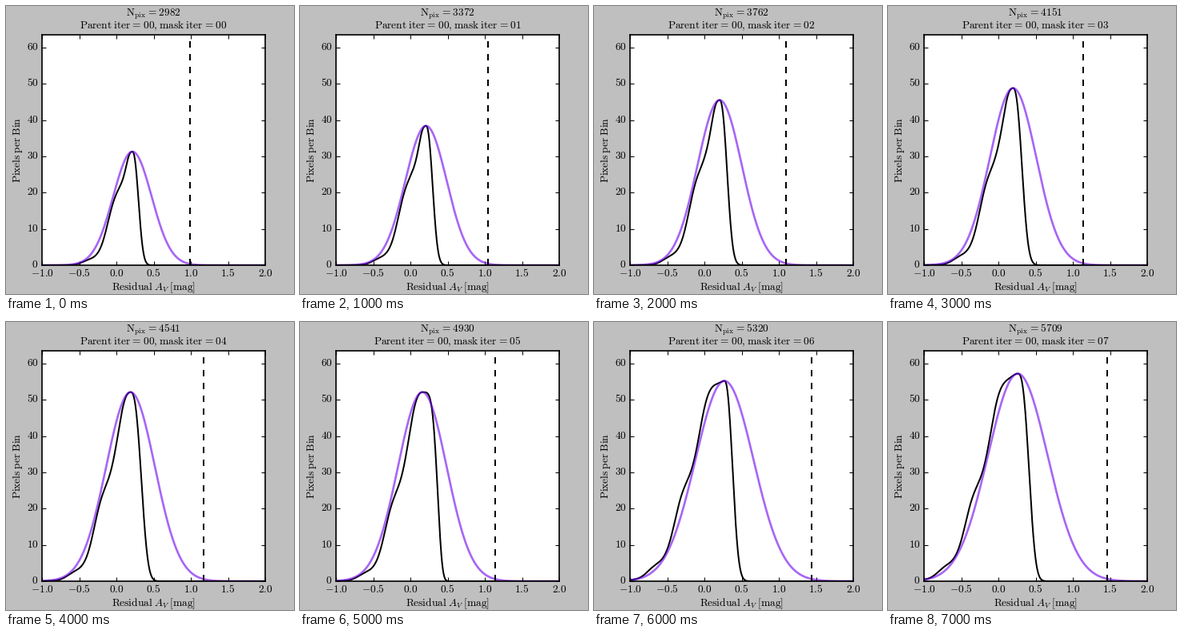
Write a matplotlib script that moves like this. It is 360 px wide and 360 px high and loops after 8 s.

```python
import matplotlib.pyplot as plt
import numpy as np
from matplotlib.animation import FuncAnimation

SIZE, DPI = 360, 96
LEFT, RIGHT, TOP, BOTTOM = 45, 324, 36, 324
X_MIN, X_MAX, Y_MAX = -1, 2, 63.5
STEPS = 8
JUMP = 6  # iteration at which the peak moves to the second hump

# Key points of the fitted curve: mean, peak height and 3-sigma cut
KEYS = [0, 2, 4, 5, 6, 7]
MEAN = [.215, .205, .19, .16, .27, .26]
HEIGHT = [31.3, 45.5, 52.1, 52.1, 55.2, 57.2]
CUT = [.989, 1.097, 1.172, 1.14, 1.441, 1.462]

plt.rcParams.update({
    "mathtext.fontset": "cm", "font.size": 10, "axes.linewidth": 1.25,
    "lines.scale_dashes": False, "savefig.facecolor": "auto",
})


def fit(i):
    mean, height, cut = (np.interp(i, KEYS, row) for row in (MEAN, HEIGHT, CUT))
    return mean, height, cut, (cut - mean) / 3


def gauss(x, mean, height, sigma):
    return height * np.exp(-0.5 * ((x - mean) / sigma) ** 2)


def histogram(x, i):
    """Rippled copy of the fit left of the peak, steep edge right of it."""
    mean, height, _, sigma = fit(i)

    lag = 0.05 if i < JUMP else -0.045
    shoulder = 0.04 - 0.046 * i
    ripple = 0.028 * np.sin(2 * np.pi * (x - shoulder) / 0.4)
    taper = 1 - np.exp(-((x - mean) / 0.08) ** 2)
    rise = gauss(x - (lag + ripple) * taper, mean, height, sigma)

    half = 0.305 + 0.0023 * i * i - mean
    power = 2.3 + 2 * (half / 0.2) ** 6
    fall = height * 0.5 ** ((np.maximum(x - mean, 0) / half) ** power)
    return np.where(x < mean, rise, fall)


def roman(text):
    """Upright math text with narrow word spaces."""
    gap = r"\hspace{0.07}"
    text = text.replace(" = ", f"{gap}={gap}").replace(", ", f",{gap}")
    return r"$\mathrm{" + text.replace(" ", r"\;") + "}$"


fig = plt.figure(figsize=(SIZE / DPI, SIZE / DPI), dpi=DPI, facecolor="0.75")
ax = fig.add_axes([LEFT / SIZE, 1 - BOTTOM / SIZE,
                   (RIGHT - LEFT) / SIZE, (BOTTOM - TOP) / SIZE])
x_ticks, y_ticks = np.arange(-1, 2.1, 0.5), np.arange(0, 61, 10)
ax.set(xlim=(X_MIN, X_MAX), ylim=(0, Y_MAX), xticks=x_ticks, yticks=y_ticks)
ax.tick_params(direction="in", length=4, width=0.75, top=True, right=True,
               labelbottom=False, labelleft=False)


def label(x, y, text="", ha="center", **kw):
    """Text with its baseline at a pixel position from the top left."""
    return fig.text(x / SIZE, 1 - y / SIZE, text, ha=ha, va="baseline", **kw)


for v in x_ticks:
    label(LEFT + (v - X_MIN) / (X_MAX - X_MIN) * (RIGHT - LEFT), 338, f"${v:.1f}$")
for v in y_ticks:
    label(40.5, BOTTOM - v / Y_MAX * (BOTTOM - TOP) + 3, f"${v}$", ha="right")

label(184.5, 355, roman("Residual ") + "$A_V$" + roman(" [mag]"))
label(18, 180, roman("Pixels per Bin"), rotation=90, rotation_mode="anchor")
count = label(184, 13)
caption = label(184.5, 28)

grid = np.linspace(X_MIN, X_MAX, 601)
black, = ax.plot([], [], "k", lw=1.5)
purple, = ax.plot([], [], color="#6e00ee", alpha=0.6, lw=2)
limit = ax.axvline(1, color="k", lw=1.5, dashes=(6, 6))


def update(i):
    mean, height, cut, sigma = fit(i)
    black.set_data(grid, histogram(grid, i))
    purple.set_data(grid, gauss(grid, mean, height, sigma))
    limit.set_xdata([cut, cut])
    count.set_text(roman(f"N_{{pix}} = {int(2982.9 + 389.57 * i)}"))
    caption.set_text(roman(f"Parent iter = 00, mask iter = {i:02d}"))
    return black, purple, limit, count, caption


anim = FuncAnimation(fig, update, frames=STEPS, interval=1000, repeat=True)
plt.show()
```
